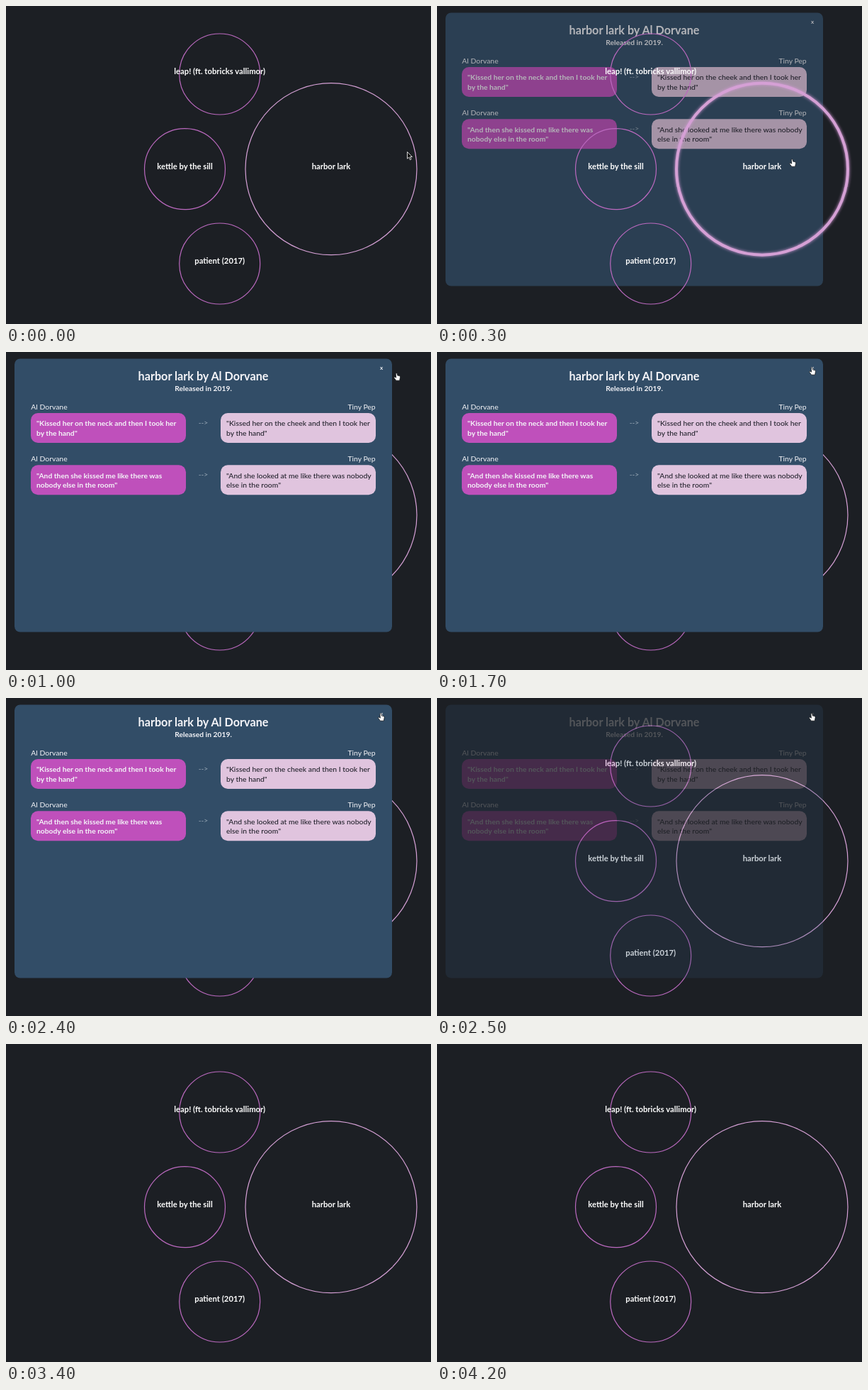
Animation of 600 by 448 pixels, one loop 4300 ms. Source, as an HTML page:

```html
<!DOCTYPE html>
<html lang="en">
<head>
<meta charset="utf-8">
<title>Song bubbles</title>
<style>
  html, body { margin: 0; width: 100%; height: 100%; overflow: hidden; background: #1c1f24; }
  svg { display: block; width: 600px; height: 448px; font: 10.4px Lato, sans-serif; }
  text { fill: #f4f4f8; }
  .mid { text-anchor: middle; }
  .end { text-anchor: end; }
  .label { font-size: 11.25px; font-weight: 700; fill: #fff; }
  .title { font-size: 16.2px; font-weight: 700; }
  .bold { font-size: 10.3px; font-weight: 700; }
  .close { font-size: 8px; font-weight: 700; }
  .dark { font-weight: 500; fill: #22222c; }
  .arrow { fill: #9aa9b8; }
  circle { fill: none; stroke: #bb69bf; stroke-width: 1.2; }
  #big { stroke: #d5a0d5; }
</style>
</head>
<body>
<svg id="stage" viewBox="0 0 600 448">
  <g id="bubbles"></g>
  <g id="panel"></g>
  <g id="cursor">
    <path id="pointer" d="M0 0V9.6L2.3 7.6L3.9 11.2L5.6 10.4L4 7H7Z"
      fill="#111" stroke="#e8e8e8" stroke-width=".9"/>
    <path id="hand" d="M-1.8 -4.7Q-.9 -6 .1 -4.7L.7 -1.9L3.3 -1.5Q4.6 -1 4.5 .6L3.7 5.2H-1.3L-4.2 1.2Q-4.3 -.3 -2.8 .2L-1.3 1.2Z"
      fill="#fff" stroke="#15181c" stroke-width=".8"/>
  </g>
</svg>
<script>
const LOOP = 4300, STEP = 100;
const $ = id => document.getElementById(id);
const stage = $("stage"), bubbles = $("bubbles"), panel = $("panel"), cursor = $("cursor");

const text = (x, y, cls, s) => `<text x="${x}" y="${y}" class="${cls}">${s}</text>`;
const bubble = (x, y, r, name, id = "") =>
  `<circle id="${id}" cx="${x}" cy="${y}" r="${r}"/>` + text(x, y, "mid label", name);
const chip = (x, y, fill, cls, lines) =>
  `<rect x="${x}" y="${y}" width="219" height="42" rx="10" fill="${fill}"/>` +
  lines.map((s, i) => text(x + 8, y + 18.3 + i * 13.3, cls, s)).join("");
const pair = (y, before, after) =>
  text(35.3, y - 5, "", "Al Dorvane") + text(521.7, y - 5, "end", "Tiny Pep") +
  chip(35, y, "#bf50bb", "bold", before) +
  text(278.5, y + 17, "mid arrow", "--&gt;") +
  chip(303, y, "#e0c4de", "dark", after);

bubbles.innerHTML =
  bubble(301.7, 96, 57, "leap! (ft. tobricks vallimor)") +
  bubble(252.5, 229.7, 57, "kettle by the sill") +
  bubble(301.7, 363, 57, "patient (2017)") +
  bubble(459, 229.7, 121, "harbor lark", "big");

panel.innerHTML =
  `<rect x="12" y="9.5" width="533" height="385" rx="8" fill="#324d67"/>` +
  text(278.5, 40.3, "mid title", "harbor lark by Al Dorvane") +
  text(278.5, 54.6, "mid bold", "Released in 2019.") +
  text(530, 24.7, "mid close", "x") +
  pair(86, ['"Kissed her on the neck and then I took her', 'by the hand"'],
           ['"Kissed her on the cheek and then I took her', 'by the hand"']) +
  pair(159.3, ['"And then she kissed me like there was', 'nobody else in the room"'],
              ['"And she looked at me like there was nobody', 'else in the room"']);

// [time, value...] tables
const path = [[0, 566.5, 205.5], [100, 548, 211], [200, 515, 219], [300, 502, 221], [500, 502, 221],
  [600, 507, 200], [700, 521, 150], [800, 539, 95], [900, 550, 52], [1000, 552, 35],
  [1100, 550, 32], [1200, 545, 29], [1500, 530, 27], [2800, 529.5, 27]];
const fade = [[0, 0], [100, 0], [200, .35], [300, .7], [400, .93], [500, 1],
  [2400, 1], [2500, .25], [2600, 0]];
const hover = [[0, 0], [100, .6], [200, 1], [400, 1], [500, .4], [600, 0]];

function at(keys, t) {
  const i = keys.findIndex(k => k[0] > t);
  if (i < 0) return keys[keys.length - 1].slice(1);
  const a = keys[i - 1], b = keys[i], p = (t - a[0]) / (b[0] - a[0]);
  return a.slice(1).map((v, n) => v + (b[n + 1] - v) * p);
}

let opening = null;
function draw(now) {
  const t = Math.floor(now % LOOP / STEP) * STEP;
  const [x, y] = at(path, t), [alpha] = at(fade, t), [glow] = at(hover, t);

  // While opening, the bubbles still lie above the panel.
  if (opening !== t < 500) {
    opening = t < 500;
    stage.insertBefore(panel, opening ? bubbles : cursor);
  }
  panel.style.opacity = alpha;

  const big = $("big").style;
  big.strokeWidth = 1.2 + 2.8 * glow;
  big.filter = glow ? `drop-shadow(0 0 ${2 * glow}px #d59ad8)` : "none";

  cursor.setAttribute("transform", `translate(${x} ${y})`);
  cursor.style.display = t < 2900 ? "" : "none";
  $("pointer").style.display = t < 100 ? "" : "none";
  $("hand").style.display = t < 100 ? "none" : "";
}

const start = performance.now();
function tick() {
  draw(performance.now() - start);
  requestAnimationFrame(tick);
}
tick();
</script>
</body>
</html>
```
